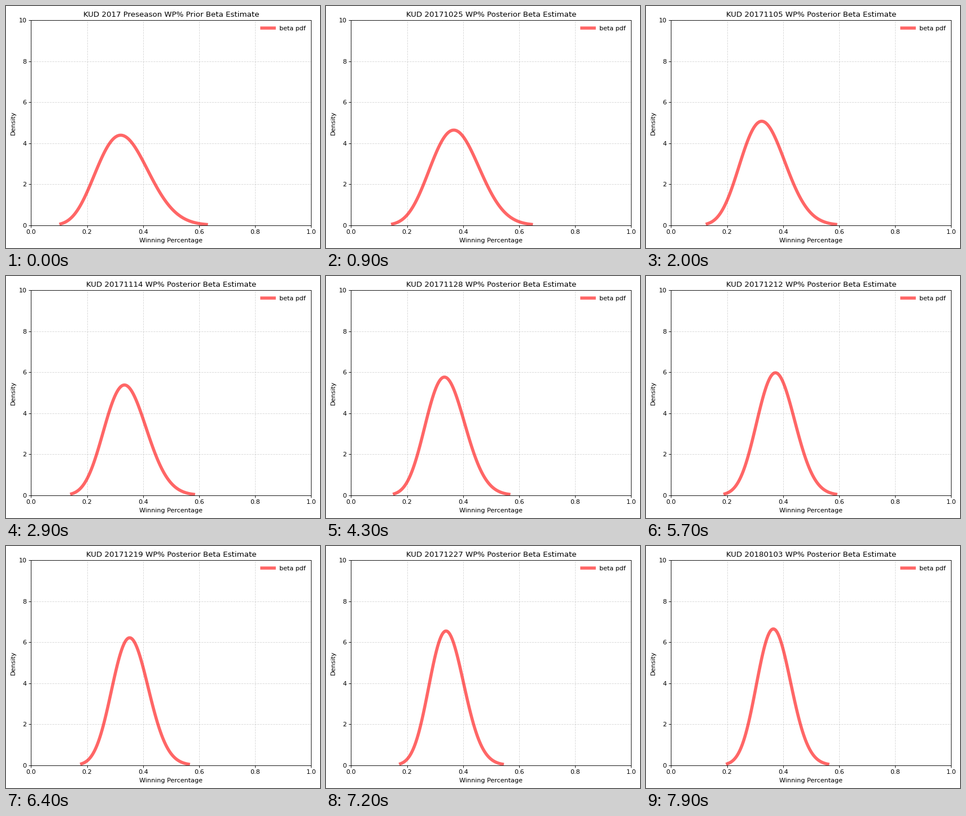
These frames come from a looping animation (556 px wide and 428 px high, 8000 ms). A matplotlib script:

```python
from math import lgamma

import matplotlib.pyplot as plt
import numpy as np
from matplotlib.animation import FuncAnimation

W, H, DPI = 556, 428, 80
DAYS, INTERVAL = 80, 100
TEAM = "KUD"
EVE = np.datetime64("2017-10-16")  # day before the season opens

# Beta prior and the season days on which games were won or lost
PRIOR_A, PRIOR_B = 9, 18
WINS = np.array([4, 6, 9, 21, 25, 32, 41, 44, 49, 52, 57, 67, 74, 77, 79])
LOSSES = np.array([2, 8, 11, 13, 15, 18, 22, 26, 29, 34, 37, 39,
                   42, 47, 54, 59, 60, 62, 65, 68, 71, 72, 76])

GRID = np.linspace(0, 1, 8001)[1:-1]

plt.rcParams.update({"font.family": "DejaVu Sans", "font.size": 10})


def beta_pdf(x, a, b):
    log_norm = lgamma(a + b) - lgamma(a) - lgamma(b)
    return np.exp(log_norm + (a - 1) * np.log(x) + (b - 1) * np.log(1 - x))


def beta_curve(a, b):
    """Density between the 0.1% and 99.9% quantiles."""
    cdf = np.cumsum(beta_pdf(GRID, a, b))
    lo, hi = np.interp([0.001, 0.999], cdf / cdf[-1], GRID)
    x = np.linspace(lo, hi, 100)
    return x, beta_pdf(x, a, b)


def heading(day):
    if day == 0:
        return f"{TEAM} 2017 Preseason WP% Prior Beta Estimate"
    date = str(EVE + day).replace("-", "")
    return f"{TEAM} {date} WP% Posterior Beta Estimate"


fig = plt.figure(figsize=(W / DPI, H / DPI), dpi=DPI, facecolor="white")
ax = fig.add_axes([44.4 / W, 40.3 / H, 496 / W, 362.4 / H])
ax.set(xlim=(0, 1), ylim=(0, 10),
       xlabel="Winning Percentage", ylabel="Density")
ax.grid(linestyle="--", alpha=0.5)
curve, = ax.plot([], [], "r-", lw=5, alpha=0.6, label="beta pdf")
ax.legend(loc="upper right", frameon=False)
title = ax.set_title("")


def update(day):
    a = PRIOR_A + np.count_nonzero(WINS <= day)
    b = PRIOR_B + np.count_nonzero(LOSSES <= day)
    curve.set_data(*beta_curve(a, b))
    title.set_text(heading(day))
    return curve, title


anim = FuncAnimation(fig, update, frames=DAYS, interval=INTERVAL,
                     repeat=True, repeat_delay=0)
plt.show()
```
